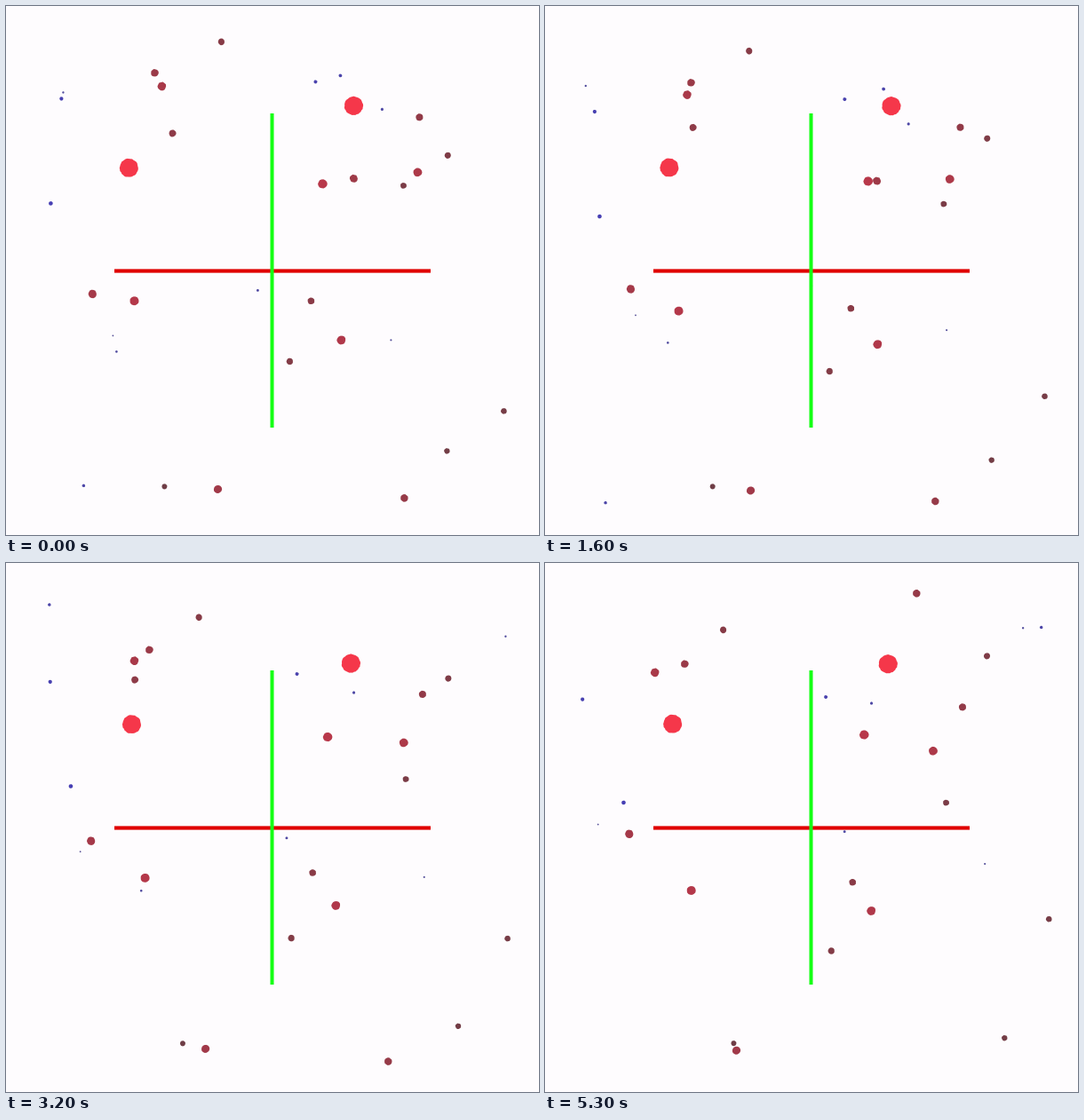
Animation, 600 px wide and 596 px high, one loop 5.4 s. Source, as a matplotlib script:

```python
import numpy as np
import matplotlib.pyplot as plt
from itertools import combinations
from matplotlib.animation import FuncAnimation
from matplotlib.collections import PolyCollection
from matplotlib.patches import Rectangle

W, H = 600, 596
FRAMES, STEP = 54, 100
PULL = 16  # strength of each sun's inverse-square gravity

# Dots leaving on the left or bottom re-enter on the opposite side.
LEFT, SPAN_X = 31.6, 535
BOTTOM, SPAN_Y = 564.25, 532

# Starting state, largest first: x, y and the unpulled drift over one loop.
SUNS = [(391, 112, -5, 1), (138, 182, 5, -1)]
BODIES = [
    (356, 200, 24, -9), (144, 332, 20, 38), (377, 376, -10, 16),
    (463, 187, -25, 26), (175, 90, -51, 31), (97, 324, -3, -18),
    (238, 544, -23, 5), (391, 194, -59, 10), (167, 75, -10, 36),
    (448, 554, -30, 12), (465, 125, 8, 38), (187, 143, -68, -23),
    (343, 332, 3, 28), (242, 40, -42, 34), (319, 400, 3, 37),
    (497, 168, 2, -63), (447, 202, 5, 69), (560, 456, 7, -55),
    (496, 501, 21, 34), (178, 541, 34, 0),
]
MOTES = [
    (50, 222, 36, 49), (62, 104, -22, 48), (348, 85, -39, 64),
    (376, 78, 13, 44), (87, 540, -64, 64), (423, 116, -40, 57),
    (283, 320, 54, -17), (124, 389, 46, -33), (64, 97, -62, -25),
    (433, 376, 62, -37), (120, 371, -61, -76),
]

rng = np.random.default_rng(4)
state = np.array(SUNS + BODIES + MOTES, float)
count = len(state)
radius = np.concatenate([
    np.full(len(SUNS), 10.4),
    np.linspace(5.2, 3.1, len(BODIES)),
    np.linspace(2.3, 0.9, len(MOTES)),
])
mass = radius ** 3


def color(r):
    """Blue for motes, then from dull to bright red with size."""
    sizes = [0.9, 2.4, 2.9, 4.2, 5.2, 10.4]
    red = np.interp(r, sizes, [84, 70, 104, 150, 184, 245])
    green = np.interp(r, sizes, [78, 62, 62, 58, 56, 55])
    blue = np.interp(r, sizes, [150, 182, 70, 72, 74, 74])
    return red / 255, green / 255, blue / 255


def ragged_disc(r):
    """Disc outline with a slightly serrated rim."""
    n = 36 if r > 6 else 14
    angle = np.linspace(0, 2 * np.pi, n, endpoint=False)
    rim = r + rng.uniform(-0.06, 0.06, n) * min(r, 6)
    return np.column_stack([rim * np.cos(angle), rim * np.sin(angle)])


def gravity(pos):
    total = np.zeros_like(pos)
    for k in range(len(SUNS)):
        gap = pos[k] - pos
        dist = np.hypot(*gap.T)
        dist[k] = np.inf
        total += PULL * gap / dist[:, None] ** 3
    return total


def merge(pos, vel, alive):
    """A touching pair becomes its larger dot and keeps the momentum."""
    for big, small in combinations(range(count), 2):
        near = np.hypot(*(pos[big] - pos[small])) < radius[big] + radius[small]
        if alive[big] and alive[small] and near:
            share = mass[small] / (mass[big] + mass[small])
            vel[big] += share * (vel[small] - vel[big])
            alive[small] = False


def simulate():
    pos, vel = state[:, :2].copy(), state[:, 2:] / (FRAMES - 1)
    alive = np.ones(count, bool)
    history = []
    for _ in range(FRAMES):
        merge(pos, vel, alive)
        history.append((pos.copy(), np.flatnonzero(alive)[::-1]))
        force = gravity(pos)
        pos += vel + force / 2
        vel += force
        pos[pos[:, 0] < LEFT, 0] += SPAN_X
        pos[pos[:, 1] > BOTTOM, 1] -= SPAN_Y
    return history


history = simulate()
shapes = [ragged_disc(r) + 0.4 for r in radius]
colors = [color(r) for r in radius]

fig = plt.figure(figsize=(W / 100, H / 100), dpi=100, facecolor="#fefcfe")
ax = fig.add_axes([0, 0, 1, 1])
ax.set_xlim(0, W)
ax.set_ylim(H, 0)
ax.axis("off")

cloud = PolyCollection([], linewidths=0, zorder=1)
ax.add_collection(cloud, autolim=False)
ax.add_patch(Rectangle((122, 296.4), 356, 4.2, fc="#e00000", lw=0,
                       snap=False, zorder=2))
ax.add_patch(Rectangle((297.5, 121), 4, 354, fc="#14ff14", lw=0,
                       snap=False, zorder=3))


def draw(i):
    pos, shown = history[i]
    cloud.set_verts([shapes[k] + pos[k] for k in shown])
    cloud.set_facecolor([colors[k] for k in shown])
    return [cloud]


anim = FuncAnimation(fig, draw, frames=FRAMES, interval=STEP, repeat=True,
                     repeat_delay=0)
plt.show()
```
